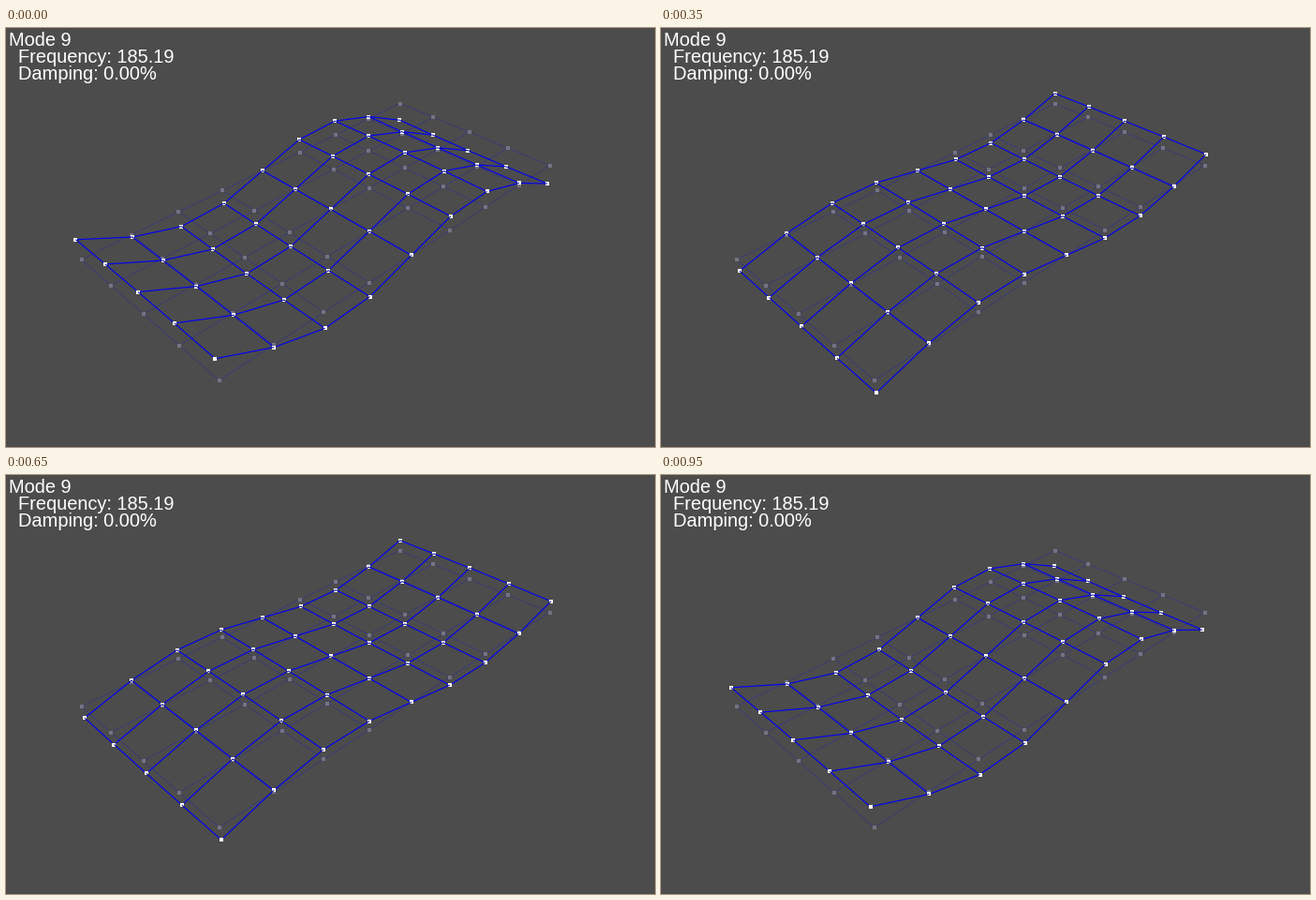
A matplotlib script that plays this animation: 693 by 447 pixels, repeating every 1 s.

```python
import numpy as np
import matplotlib.pyplot as plt
from matplotlib.animation import FuncAnimation
from matplotlib.collections import LineCollection

WIDTH, HEIGHT, DPI = 693, 447, 100
FRAMES, INTERVAL = 20, 50
PX = 72 / DPI
NU, NV = 9, 5

# Perspective weights and screen corners of the flat plate
CORNERS = np.array([[80.5, 247], [420.5, 80.5], [227.5, 376], [580.5, 146.5]])
WEIGHTS = np.array([1, 1.3208, 0.8178, 1.1386])
VERTICAL_VANISHING = np.array([420, 1440])

# Half of the antisymmetric bending shape, along the rim and the centre line
RIM = np.array([-0.0175, 0.0021, 0.0137, 0.0122])
CENTRE = np.array([-0.0184, 0.0016, 0.0145, 0.0127])


def antisymmetric(half):
    return np.concatenate([half, [0], -half[::-1]])


u, v = np.meshgrid(np.linspace(0, 1, NU), np.linspace(0, 1, NV), indexing="ij")
blend = np.stack([(1 - u) * (1 - v), u * (1 - v), (1 - u) * v, u * v], -1)
blend = blend.reshape(-1, 4)
depth = blend @ WEIGHTS
flat = blend @ (CORNERS * WEIGHTS[:, None])

bulge = 1 - (2 * np.linspace(0, 1, NV) - 1) ** 2
rim, centre = antisymmetric(RIM), antisymmetric(CENTRE)
mode = (rim[:, None] + np.outer(centre - rim, bulge)).ravel()

index = np.arange(NU * NV).reshape(NU, NV)
edges = np.concatenate([
    np.stack([index[:-1].ravel(), index[1:].ravel()], 1),
    np.stack([index[:, :-1].ravel(), index[:, 1:].ravel()], 1),
])


def project(amplitude):
    shift = amplitude * mode
    weight = depth + shift
    points = (flat + shift[:, None] * VERTICAL_VANISHING) / weight[:, None]
    return points, weight


def near_stubs(points, weight):
    """Parts of edges that pass in front of the marker at their far end."""
    a, b = edges.T
    far = np.where(weight[a] > weight[b], a, b)
    near = a + b - far
    step = points[near] - points[far]
    reach = 2.5 / np.abs(step).max(axis=1, keepdims=True)
    return np.stack([points[far], points[far] + step * np.minimum(reach, 1)], 1)


fig = plt.figure(figsize=(WIDTH / DPI, HEIGHT / DPI), dpi=DPI, facecolor="#4c4c4c")
ax = fig.add_axes([0, 0, 1, 1])
ax.set(xlim=(0, WIDTH), ylim=(HEIGHT, 0))
ax.axis("off")


def add_lines(color, width, zorder):
    lines = LineCollection([], colors=color, linewidths=width * PX, zorder=zorder)
    return ax.add_collection(lines, autolim=False)


def add_markers(color, zorder):
    return ax.plot([], [], "s", color=color, markersize=5 * PX,
                   markeredgewidth=0, zorder=zorder)[0]


rest_lines = add_lines("#3c3c74", 1, 1)
rest_markers = add_markers("#737385", 2)
mesh_lines = add_lines("#0000f5", 1.15, 3)
mesh_markers = add_markers("white", 4)
mesh_stubs = add_lines("#00008c", 1, 5)

rest, _ = project(0)
rest_lines.set_segments(rest[edges])
rest_markers.set_data(*rest.T)

for x, baseline, label in [(2.8, 19, "Mode 9"),
                           (12.6, 37, "Frequency: 185.19"),
                           (12.6, 55, "Damping: 0.00%")]:
    ax.text(x, baseline, label, color="white", fontsize=20 * PX,
            family="Liberation Sans", va="baseline", zorder=6)


def update(frame):
    points, weight = project(np.cos(2 * np.pi * frame / FRAMES))
    mesh_lines.set_segments(points[edges])
    mesh_markers.set_data(*points.T)
    mesh_stubs.set_segments(near_stubs(points, weight))
    return mesh_lines, mesh_markers, mesh_stubs


animation = FuncAnimation(fig, update, frames=FRAMES, interval=INTERVAL,
                          repeat=True, repeat_delay=0)
plt.show()
```
